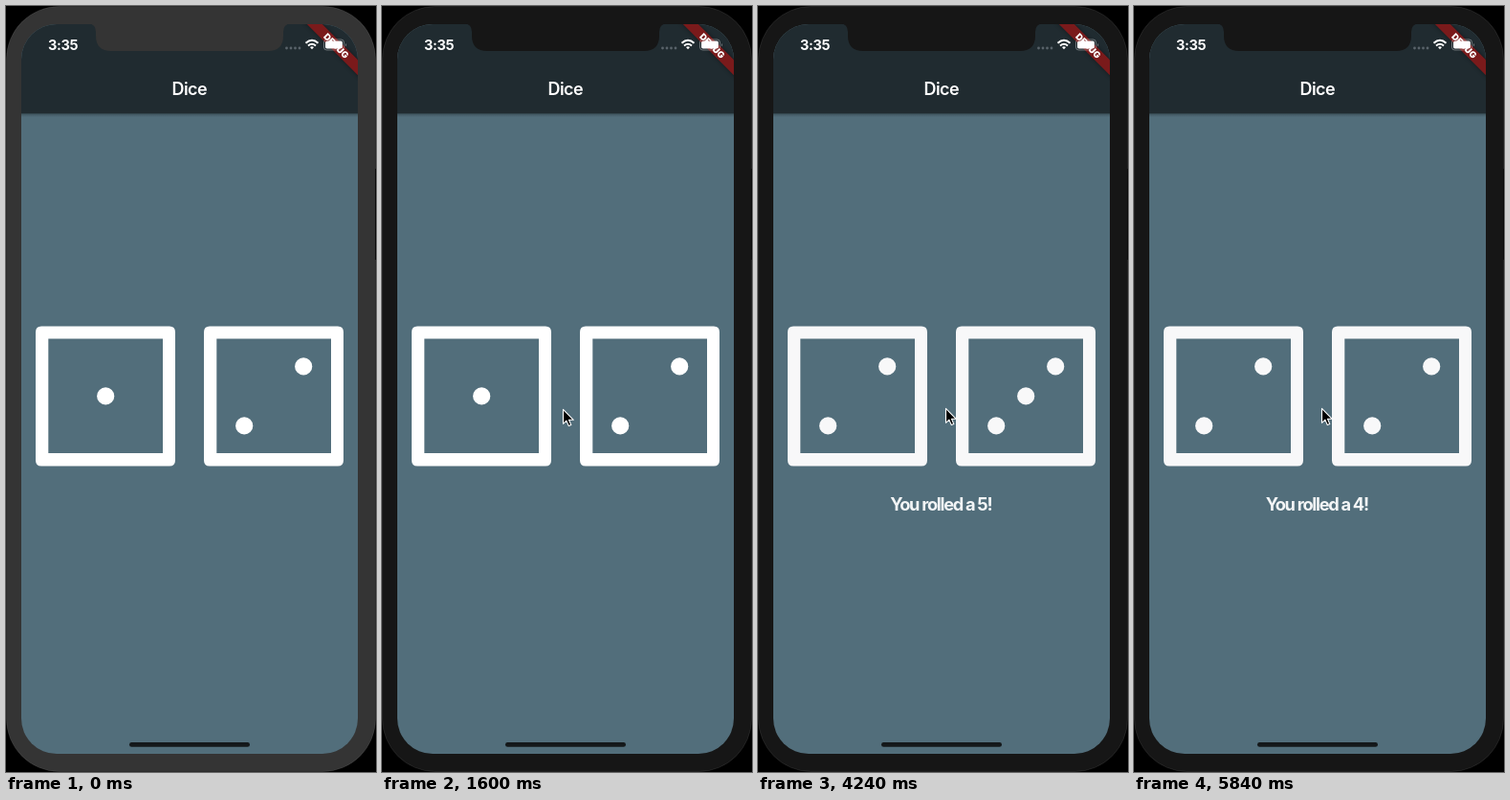
An HTML page for the animation above (6.56 s loop, 387 px wide and 800 px high).

```html
<!DOCTYPE html>
<html lang="en">
<head>
<meta charset="utf-8">
<title>Dice</title>
<style>
  html, body { margin: 0; width: 100%; height: 100%; overflow: hidden; background: #000; }
  svg { display: block; width: 100vw; height: 100vh; }
  text { font-family: Inter, Roboto, sans-serif; font-weight: 600; fill: #fff; text-anchor: middle; }
  #clock { font-size: 14.5px; font-weight: 700; letter-spacing: -.3px; }
  #title { font-size: 18px; letter-spacing: -.6px; }
  #result { font-size: 18.3px; font-weight: 700; letter-spacing: -1.3px; fill: #f3f5f6; }
  #debug { font-size: 9.4px; font-weight: 900; }
</style>
</head>
<body>
<svg viewBox="0 0 387 800">
  <defs>
    <clipPath id="screen"><rect x="16" y="19" width="352" height="762" rx="37"/></clipPath>
    <linearGradient id="shade" x2="0" y2="1">
      <stop stop-color="#000" stop-opacity=".28"/>
      <stop offset="1" stop-color="#000" stop-opacity="0"/>
    </linearGradient>
    <filter id="soft" x="-20%" y="-60%" width="140%" height="220%"><feGaussianBlur stdDeviation="2"/></filter>
  </defs>

  <rect id="bezel" x=".5" y=".5" width="386" height="799" rx="55" stroke="#fff" stroke-opacity=".08"/>
  <rect x="386" y="170" width="1" height="95" fill="#0a0a0a"/>

  <g clip-path="url(#screen)">
    <rect x="16" y="19" width="352" height="762" fill="#526e7b"/>
    <rect x="16" y="112" width="352" height="4" fill="url(#shade)"/>
    <rect x="16" y="19" width="352" height="93.3" fill="#202b30"/>
    <g transform="translate(368 19) rotate(45)">
      <rect x="-45" y="26.3" width="90" height="11.3" fill="#000" opacity=".4" filter="url(#soft)"/>
      <rect x="-45" y="26.3" width="90" height="11.3" fill="#7a1a1b"/>
    </g>
  </g>
  <path id="notch" d="M86 18H298Q290 19 290 27V31Q290 47 274 47H110Q94 47 94 31V27Q94 19 86 18Z"/>

  <text id="clock" x="59.6" y="46">3:35</text>
  <text id="title" x="191.8" y="93">Dice</text>

  <g fill="#59636a">
    <circle cx="293.5" cy="44" r="1.4"/><circle cx="298" cy="44" r="1.4"/>
    <circle cx="302.5" cy="44" r="1.4"/><circle cx="307" cy="44" r="1.4"/>
  </g>
  <g fill="none" stroke="#fff" stroke-width="2">
    <path d="M313.5 38.8Q320 32.8 326.5 38.8M316 41.6Q320 38 324 41.6"/>
    <path d="M318 43L320 45.2 322 43Q320 41.6 318 43Z" fill="#fff" stroke="none"/>
  </g>
  <rect x="332.5" y="35" width="21" height="11" rx="3" fill="none" stroke="#fff" stroke-opacity=".35"/>
  <rect x="334" y="36.5" width="18" height="8" rx="1.8" fill="#fff"/>
  <path d="M355 39Q357 40.5 355 42.5Z" fill="#fff" opacity=".4"/>
  <text id="debug" transform="translate(345.4 41.6) rotate(45)" y="3.4">DEBUG</text>

  <g id="dice"></g>
  <text id="result" x="191.2" y="527"></text>
  <rect x="129" y="769" width="126" height="4.8" rx="2.4" fill="#14181a"/>
  <path id="cursor" d="M0 0V15L3.4 11.8 5.8 17.3 8.3 16.3 6 11H10.8Z"
        fill="#000" stroke="#fff" stroke-width="1.1" stroke-linejoin="round"/>
</svg>
<script>
const LOOP = 6560, STEP = 80;
const $ = id => document.getElementById(id);

// Each entry: start time, left die, right die
const rolls = [[0, 1, 2], [1680, 3, 6], [2880, 4, 6], [4240, 2, 3], [5680, 2, 2]];

// Pip positions on a -1..1 grid
const diagonal = [[1, -1], [-1, 1]];
const corners = [...diagonal, [-1, -1], [1, 1]];
const center = [[0, 0]];
const sides = [[-1, 0], [1, 0]];
const faces = {
  1: center,
  2: diagonal,
  3: [...diagonal, ...center],
  4: corners,
  6: [...corners, ...sides]
};

function die(x, value) {
  const pips = faces[value].map(([i, j]) =>
    `<circle cx="${x + 73.2 + 31 * i}" cy="${407.4 + 31 * j}" r="9.1"/>`);
  return `<path fill-rule="evenodd" d="M${x + 6} 334.4h134q6 0 6 6v134q0 6-6 6h-134q-6 0-6-6v-134q0-6 6-6Z
    M${x + 13.3} 347.6v119.5h119.7v-119.5Z"/>${pips.join('')}`;
}

let shown = null;
function showRoll(roll) {
  if (roll === shown) return;
  shown = roll;
  const [start, left, right] = roll;
  $('dice').innerHTML = die(31, left) + die(207, right);
  $('dice').setAttribute('fill', start ? '#f8f8f9' : '#fff');
  $('result').textContent = start ? `You rolled a ${left + right}!` : '';
}

const progress = (t, from, to) => Math.min(1, Math.max(0, (t - from) / (to - from)));

function draw(time) {
  const t = Math.floor(time % LOOP / STEP) * STEP;
  showRoll(rolls.findLast(([start]) => start <= t));

  const bezel = t < 1600 ? '#343434' : '#161616';
  $('bezel').setAttribute('fill', bezel);
  $('notch').setAttribute('fill', bezel);

  const left = (1 - progress(t, 720, 1280)) ** 2;
  const nudge = progress(t, 3600, 3920) ** 1.5;
  const x = 189.5 + 162 * left + 7 * nudge;
  const y = 421.3 + 41 * left - nudge;
  $('cursor').setAttribute('transform', `translate(${x} ${y})`);
  $('cursor').setAttribute('visibility', t < 720 ? 'hidden' : 'visible');
}

const begin = performance.now();
function tick() {
  draw(performance.now() - begin);
  requestAnimationFrame(tick);
}
tick();
</script>
</body>
</html>
```
